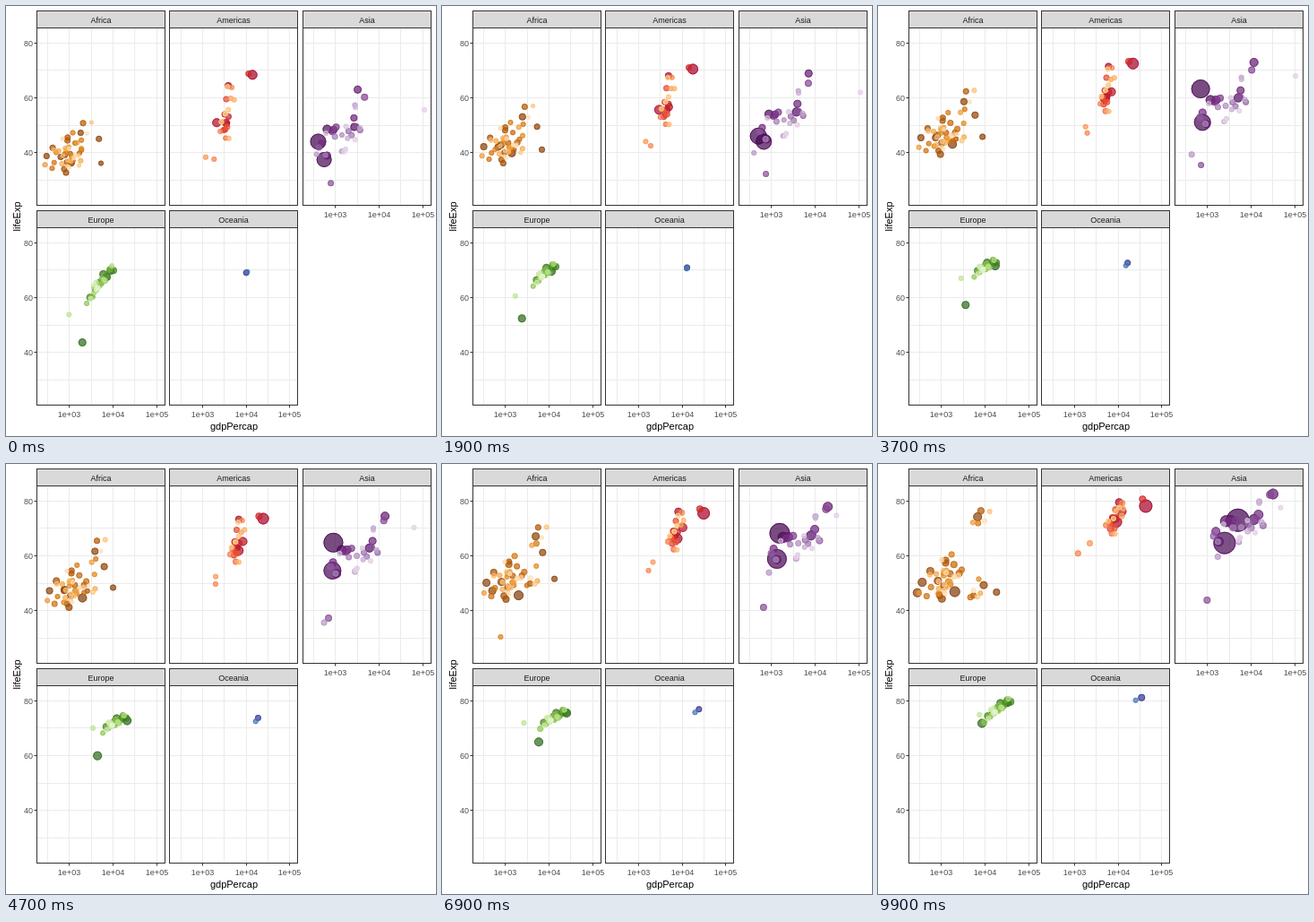
These frames come from a looping animation (480x480 px, 10000 ms). An HTML page with a canvas:

```html
<!DOCTYPE html>
<html>
<head>
<meta charset="utf-8">
<style>
html, body { margin: 0; width: 100%; height: 100%; overflow: hidden; background: #fff; }
canvas { display: block; }
</style>
</head>
<body>
<canvas id="stage" width="480" height="480"></canvas>
<script>
const ctx = document.getElementById('stage').getContext('2d');
const FONT = '"Liberation Sans", Arial, sans-serif';
const FIRST = 1952, SPAN = 55, FRAMES = 100;
const W = 143, H = 198;

let seed = 11;
const random = () => (seed = seed * 16807 % 2147483647) / 2147483647;
const spread = () => random() + random() - 1;
const mix = (a, b, k) => a + (b - a) * k;

// A dot of its own: shade 0 (dark) to 1 (pale), final population in millions, [year, income, life] points
const dot = (shade, pop, ...points) => ({
  shade, pop,
  path: points.map(([year, income, life]) => [year, Math.log10(income), life])
});

// A cloud spreads dots along a line that moves from key to key.
// Each key is [year, poor income, short life, rich income, long life].
function cloud(count, people, incomeJitter, lifeJitter, ...keys) {
  return Array.from({ length: count }, (_, i) => {
    const shade = mix(.06, 1, i / (count - 1));
    const wealth = .5 + .55 * spread();
    const dx = incomeJitter * spread(), dy = lifeJitter * spread();
    const path = keys.map(([year, poor, short, rich, long]) => [
      year,
      mix(Math.log10(poor), Math.log10(rich), wealth) + dx,
      mix(short, long, wealth) + dy
    ]);
    return { shade, pop: people(shade), path };
  });
}

const decay = (top, rate) => shade => top * Math.exp(-rate * shade);

// growth: the first year's share of the final population
const panels = [
  {
    name: 'Africa', col: 0, row: 0, yAxis: true, growth: .27,
    ramp: ['7f3b08', 'b35806', 'e08214', 'fdb863', 'fee0b6'],
    dots: [
      dot(0, 135, [1952, 1077, 36.3], [1977, 1982, 44.5], [2007, 2014, 46.9]),
      dot(.06, 64, [1952, 781, 39.1], [1977, 796, 47.8], [2007, 278, 46.5]),
      dot(.08, 44, [1952, 4725, 45], [1992, 7225, 61.9], [2007, 9270, 49.3]),
      dot(.5, 9, [1952, 493, 40], [1987, 848, 44], [1992, 737, 23.6], [1997, 590, 36.1], [2007, 863, 46.2]),
      ...cloud(35, decay(85, 4.5), .4, 8,
        [1952, 420, 35, 1500, 43], [1987, 500, 46, 2100, 56], [2007, 480, 46, 2300, 57]),
      ...cloud(6, decay(80, 4.5), .15, 3,
        [1952, 1200, 41, 3000, 51], [1980, 2800, 56, 6500, 67], [2007, 4200, 70, 12000, 76]),
      ...cloud(7, decay(25, 3), .3, 6,
        [1952, 700, 35, 4000, 43], [1987, 2300, 48, 9000, 60], [2007, 3800, 43, 13000, 54])
    ]
  },
  {
    name: 'Americas', col: 1, row: 0, growth: .4,
    ramp: ['a50026', 'd73027', 'f46d43', 'fdae61', 'fee090'],
    dots: [
      dot(0, 301, [1952, 13990, 68.4], [1977, 24073, 73.4], [2007, 42952, 78.2]),
      dot(.04, 190, [1952, 2109, 50.9], [1967, 3430, 57.6], [1977, 6660, 61.5], [2007, 9066, 72.4]),
      dot(.08, 109, [1952, 3478, 50.8], [1982, 9611, 67.4], [2007, 11978, 76.2]),
      dot(.2, 33, [1952, 11367, 68.8], [2007, 36319, 80.7]),
      dot(.58, 8.5, [1952, 1840, 37.6], [1982, 2011, 51.5], [2007, 1202, 60.9]),
      ...cloud(20, decay(60, 3), .3, 5,
        [1952, 2000, 40, 5200, 66], [1980, 3500, 56, 9500, 74], [2007, 3600, 68, 15500, 78])
    ]
  },
  {
    name: 'Asia', col: 2, row: 0, xAxis: true, growth: .38,
    ramp: ['40004b', '762a83', '9970ab', 'c2a5cf', 'e7d4e8'],
    dots: [
      dot(0, 1318, [1952, 400, 44], [1957, 576, 50.5], [1962, 488, 44.5], [1967, 613, 58.4],
        [1972, 677, 63.1], [1992, 1656, 68.7], [2007, 4959, 73]),
      dot(.03, 1110, [1952, 547, 37.4], [1962, 658, 43.6], [1977, 813, 54.2], [2007, 2452, 64.7]),
      dot(.16, 127, [1952, 3217, 63], [1967, 9848, 71.4], [2007, 31656, 82.6]),
      dot(.38, 32, [1952, 779, 28.8], [1992, 649, 41.7], [2007, 975, 43.8]),
      dot(.68, 14, [1952, 368, 39.4], [1972, 422, 40.3], [1977, 525, 31.2], [1982, 624, 51], [2007, 1714, 59.7]),
      dot(.97, 2.5, [1952, 108382, 55.6], [1972, 109348, 67.7], [1987, 28118, 74.2], [2007, 47307, 77.6]),
      ...cloud(27, decay(220, 4.3), .45, 6,
        [1952, 480, 35, 4500, 60], [1980, 750, 51, 15500, 73], [2007, 1200, 62, 32000, 81])
    ]
  },
  {
    name: 'Europe', col: 0, row: 1, yAxis: true, xAxis: true, growth: .72,
    ramp: ['276419', '4d9221', '7fbc41', 'b8e186', 'e6f5d0'],
    dots: [
      dot(0, 82, [1952, 7144, 67.5], [1977, 20513, 72.5], [2007, 32170, 79.4]),
      dot(.03, 71, [1952, 1969, 43.6], [1962, 2323, 52.1], [1977, 4269, 59.5], [2007, 8458, 71.8]),
      dot(.79, 4.5, [1952, 974, 53.8], [1977, 3528, 69.9], [1992, 2547, 72.2], [2007, 7446, 74.9]),
      ...cloud(27, decay(75, 4), .12, 2,
        [1952, 2100, 57, 12500, 73.5], [1967, 4800, 67, 18500, 73.5],
        [1992, 5400, 70, 31000, 78], [2007, 8200, 72, 46000, 82])
    ]
  },
  {
    name: 'Oceania', col: 1, row: 1, xAxis: true, growth: .43,
    ramp: ['313695', '4575b4'],
    dots: [
      dot(0, 20, [1952, 10040, 69.1], [1977, 18334, 73.5], [2007, 34435, 81.2]),
      dot(1, 4, [1952, 10557, 69.4], [1977, 16234, 72.2], [2007, 25185, 80.2])
    ]
  }
];

function rampColor(stops, k) {
  const pos = k * (stops.length - 1), i = Math.min(Math.floor(pos), stops.length - 2);
  const part = (hex, c) => parseInt(hex.slice(c * 2, c * 2 + 2), 16);
  return `rgb(${[0, 1, 2].map(c => Math.round(mix(part(stops[i], c), part(stops[i + 1], c), pos - i)))})`;
}

for (const p of panels) {
  p.x = 34.5 + 148.49 * p.col;
  p.y = 24.5 + 223 * p.row;
  p.dots.sort((a, b) => b.pop - a.pop);
  for (const d of p.dots) d.color = rampColor(p.ramp, d.shade);
}

const px = (p, log) => p.x + 36.4 + 48.7 * (log - 3);
const py = (p, life) => p.y + 16.9 + 3.055 * (80 - life);
const crisp = v => Math.floor(v) + .5;

function line(x1, y1, x2, y2, color) {
  ctx.strokeStyle = color;
  ctx.beginPath();
  ctx.moveTo(x1, y1);
  ctx.lineTo(x2, y2);
  ctx.stroke();
}

function text(str, x, y, size, color, align = 'center') {
  ctx.font = `${size}px ${FONT}`;
  ctx.fillStyle = color;
  ctx.textAlign = align;
  ctx.fillText(str, x, y);
}

function circle(x, y, r) {
  ctx.beginPath();
  ctx.arc(x, y, r, 0, 2 * Math.PI);
}

function drawGrid(p) {
  const left = crisp(p.x), bottom = p.y + H;
  for (let log = 2.5; log <= 5; log += .5) {
    const x = crisp(px(p, log));
    line(x, p.y, x, bottom, '#ebebeb');
    if (p.xAxis && log > 2.5 && log % 1 === 0) {
      line(x, bottom, x, bottom + 3, '#333');
      text('1e+0' + log, x, bottom + 13.5, 9, '#4d4d4d');
    }
  }
  for (let life = 30; life <= 80; life += 10) {
    const y = crisp(py(p, life));
    line(left, y, left + W, y, '#ebebeb');
    if (p.yAxis && life % 20 === 0) {
      line(left - 3, y, left, y, '#333');
      text(life, left - 4.5, y + 3.5, 9, '#4d4d4d', 'right');
    }
  }
}

function drawDots(p, year) {
  const left = (FIRST + SPAN - year) / SPAN;
  ctx.globalAlpha = .7;
  for (const { path, pop, color } of p.dots) {
    const next = Math.max(1, path.findIndex(point => point[0] >= year));
    const a = path[next - 1], b = path[next], k = (year - a[0]) / (b[0] - a[0]);
    const x = px(p, mix(a[1], b[1], k)), y = py(p, mix(a[2], b[2], k));
    const size = 2 + 10 * Math.sqrt(pop * p.growth ** left / 1318);
    const r = Math.round(size * 2.134 + .7) / 2 - .5;
    ctx.fillStyle = ctx.strokeStyle = color;
    circle(x, y, r + .5);
    ctx.fill();
    circle(x, y, r);
    ctx.stroke();
  }
  ctx.globalAlpha = 1;
}

function drawFrame(p) {
  const left = crisp(p.x);
  ctx.strokeStyle = '#333';
  ctx.strokeRect(left, p.y, W, H);
  ctx.fillStyle = '#d9d9d9';
  ctx.fillRect(left, p.y - 19, W, 19);
  ctx.strokeRect(left, p.y - 19, W, 19);
  text(p.name, left + W / 2, p.y - 6, 9, '#1a1a1a');
}

function draw(now) {
  const frame = Math.floor(now / 100) % FRAMES;
  const year = FIRST + SPAN * frame / (FRAMES - 1);
  ctx.fillStyle = '#fff';
  ctx.fillRect(0, 0, 480, 480);
  for (const p of panels) {
    drawGrid(p);
    drawDots(p, year);
    drawFrame(p);
  }
  text('gdpPercap', 254.5, 473, 11, '#000');
  ctx.save();
  ctx.translate(16, 235);
  ctx.rotate(-Math.PI / 2);
  text('lifeExp', 0, 0, 11, '#000');
  ctx.restore();
}

const start = performance.now();
function tick() {
  draw(performance.now() - start);
  requestAnimationFrame(tick);
}
tick();
</script>
</body>
</html>
```
